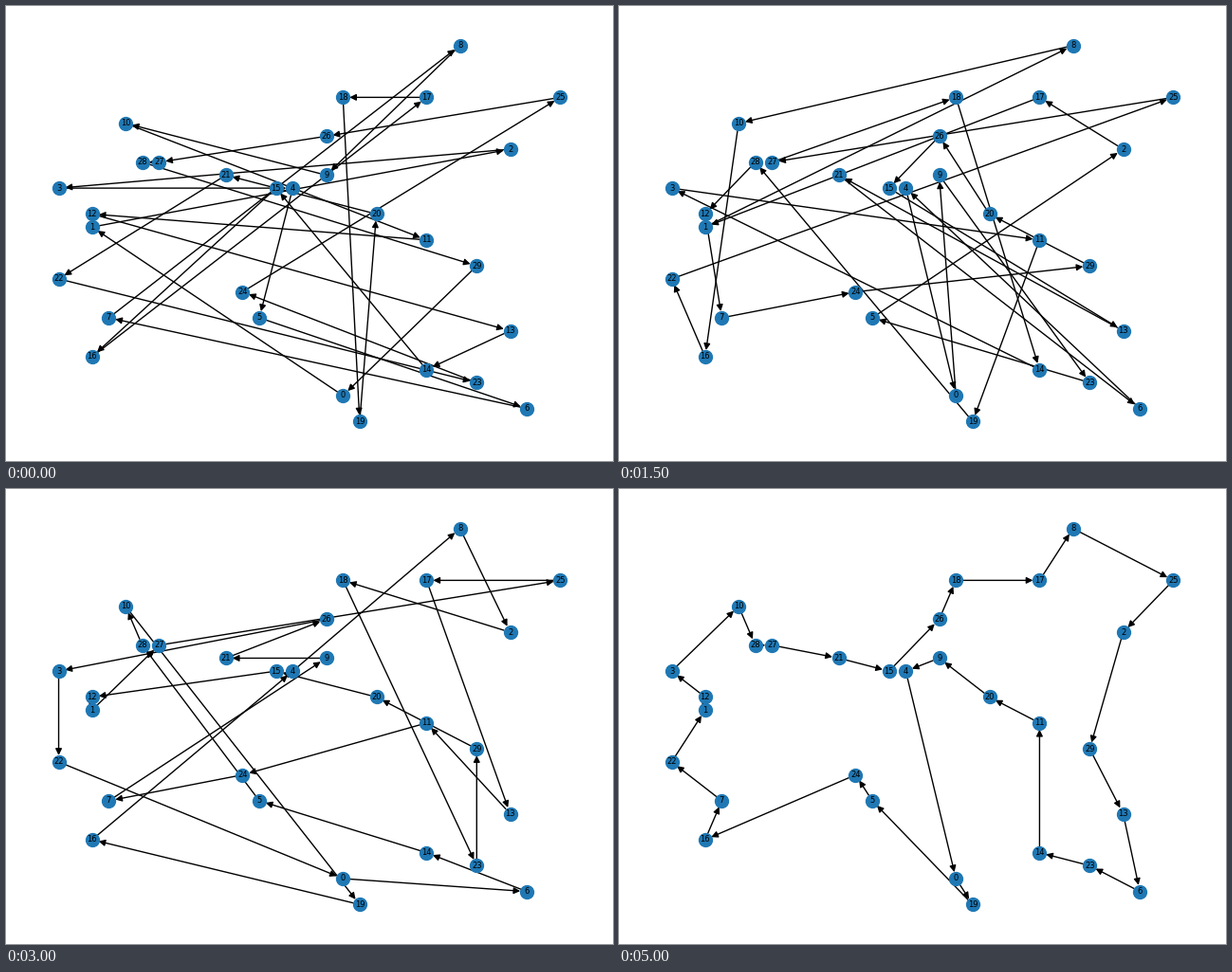
These frames come from a looping animation (640 px wide and 480 px high, 6000 ms). A matplotlib script:

```python
import matplotlib.pyplot as plt
from matplotlib.animation import FuncAnimation
from matplotlib.patches import FancyArrowPatch

STEP_MS = 500
HOLD = 1  # extra steps on the last tour
NODE_SIZE = 100

# City positions on an integer grid.
cities = [
    (17, 2), (2, 15), (27, 21), (0, 18), (14, 18), (12, 8),
    (28, 1), (3, 8), (24, 29), (16, 19), (4, 23), (22, 14),
    (2, 16), (27, 7), (22, 4), (13, 18), (2, 5), (22, 25),
    (17, 25), (18, 0), (19, 16), (10, 19), (0, 11), (25, 3),
    (11, 10), (30, 25), (16, 22), (6, 20), (5, 20), (25, 12),
]

tours = [list(range(len(cities)))]


def add(*tour):
    tours.append(list(tour))


def move(tour, *pairs):
    """Copy the tour, placing each city right after its new neighbour."""
    tour = list(tour)
    for city, after in pairs:
        tour.remove(city)
        tour.insert(tour.index(after) + 1, city)
    return tour


def flip(tour, first, last):
    """Copy the tour with the stretch first..last reversed."""
    i, j = tour.index(first), tour.index(last) + 1
    return tour[:i] + tour[i:j][::-1] + tour[j:]


add(0, 9, 28, 17, 22, 1, 5, 27, 6, 25, 10, 2, 16, 3, 13,
    8, 24, 18, 7, 29, 15, 23, 12, 26, 19, 14, 4, 11, 21, 20)
add(24, 4, 21, 28, 26, 13, 0, 17, 10, 7, 2, 14, 12, 9, 27,
    23, 29, 11, 15, 20, 1, 16, 18, 5, 3, 25, 6, 19, 8, 22)
add(0, 9, 23, 5, 2, 17, 1, 8, 10, 16, 22, 25, 27, 18, 14,
    3, 11, 19, 28, 12, 7, 24, 29, 20, 26, 15, 13, 21, 6, 4)
add(0, 13, 22, 15, 11, 25, 8, 26, 29, 5, 14, 18, 12, 24, 2,
    16, 21, 6, 1, 20, 4, 28, 7, 17, 23, 3, 27, 10, 9, 19)
add(0, 13, 22, 16, 21, 6, 1, 20, 4, 17, 25, 2, 18, 23, 29,
    5, 28, 27, 10, 8, 26, 15, 12, 24, 14, 11, 3, 9, 19, 7)
add(0, 6, 14, 5, 28, 10, 19, 16, 4, 8, 2, 18, 23, 29, 20,
    15, 12, 1, 27, 25, 17, 13, 11, 24, 7, 9, 21, 26, 3, 22)

# The last tours are small rearrangements of one good route.
route = [0, 5, 16, 7, 22, 3, 1, 12, 10, 27, 28, 21, 4, 26, 18,
         17, 8, 25, 2, 29, 14, 23, 6, 13, 11, 20, 9, 15, 24, 19]
rough = move(route, (24, 5), (28, 12), (15, 21), (9, 4), (25, 2),
             (17, 25), (18, 17), (26, 18), (20, 26), (11, 20))
better = flip(move(route, (24, 5), (19, 0), (3, 12), (10, 28),
                   (15, 21), (4, 9)), 14, 13)
best = flip(better, 27, 10)
tours += [rough, route, better, best]

fig = plt.figure(figsize=(6.4, 4.8), dpi=100, facecolor="white")
ax = fig.add_axes((0, 0, 1, 1))
ax.set_axis_off()
ax.set_xlim(-3.15, 33.15)
ax.set_ylim(-3.045, 32.045)

ax.scatter(*zip(*cities), s=NODE_SIZE, c="#1f78b4", linewidths=1, zorder=2)
for i, (x, y) in enumerate(cities):
    ax.text(x, y, str(i), size=6, family="DejaVu Sans", color="black",
            ha="center", va="center", zorder=3)

margin = NODE_SIZE ** 0.5 / 2
arrows = [
    ax.add_patch(FancyArrowPatch(
        (0, 0), (1, 1), arrowstyle="-|>", mutation_scale=10, color="black",
        linewidth=1, shrinkA=margin, shrinkB=margin, zorder=1))
    for _ in cities
]


def draw(step):
    tour = tours[min(step, len(tours) - 1)]
    for arrow, a, b in zip(arrows, tour, tour[1:] + tour[:1]):
        arrow.set_positions(cities[a], cities[b])
    return arrows


anim = FuncAnimation(fig, draw, frames=len(tours) + HOLD, interval=STEP_MS,
                     init_func=lambda: draw(0), repeat=True, repeat_delay=0)
plt.show()
```
